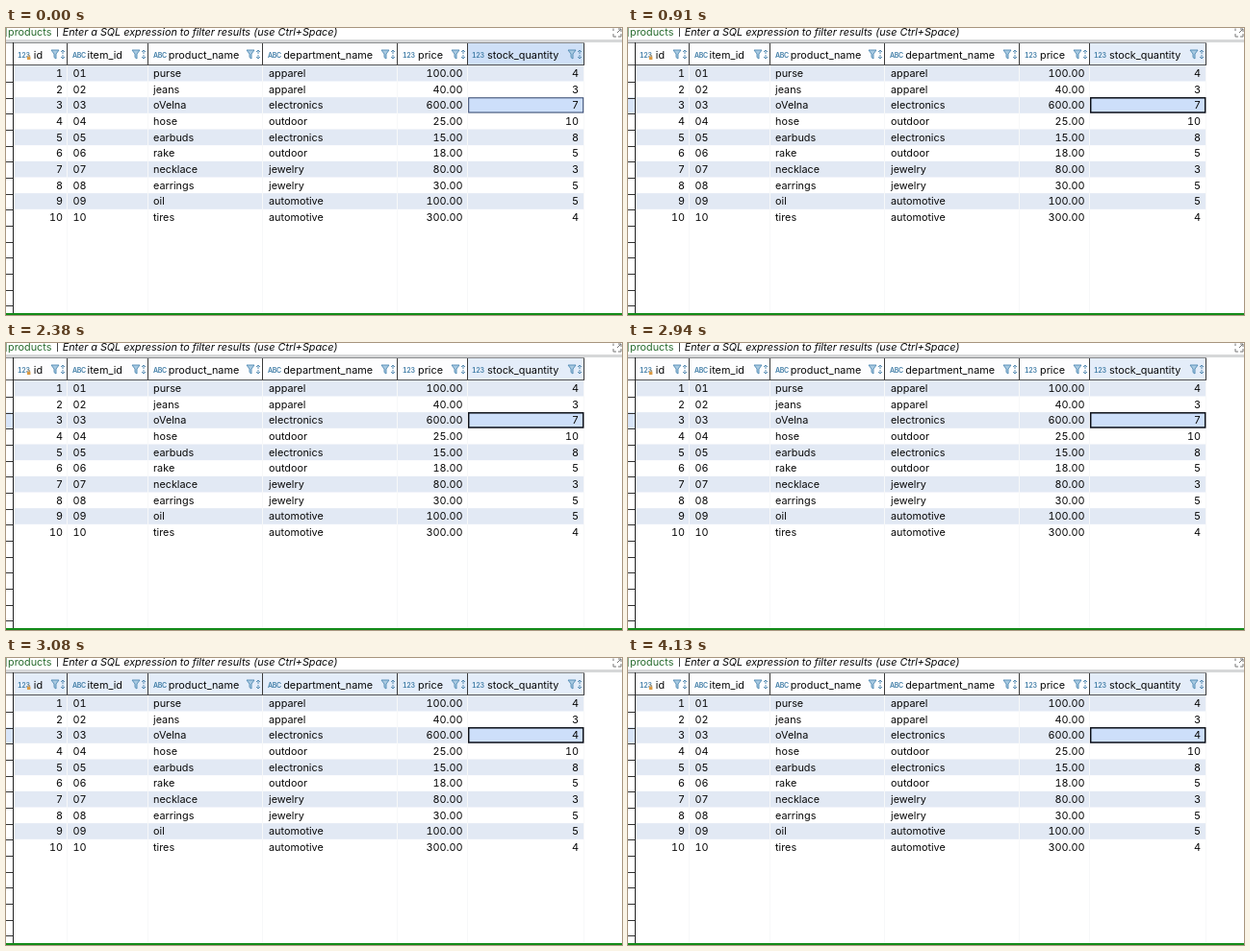
Write an HTML page that moves like this. It is 640 px wide and 299 px high and loops after 4270 ms.

```html
<!DOCTYPE html>
<html lang="en">
<head>
<meta charset="utf-8">
<title>Product table</title>
<style>
  html, body { margin: 0; width: 100%; height: 100%; overflow: hidden; background: #fff; }
  svg { display: block; width: 100vw; height: 100vh; }
  text { font: 10.85px Inter, "Open Sans", sans-serif; fill: #080808; font-variant-numeric: tabular-nums; }
  .hint { font-style: italic; }
  .table { fill: #276b2d; }
  .kind { font-size: 7px; font-weight: 600; fill: #3f7ca6; letter-spacing: -.3px; }
</style>
</head>
<body>
<svg id="stage" viewBox="0 0 640 299" preserveAspectRatio="none"></svg>
<script>
const LOOP = 4270, SELECT_AT = 630, EDIT_AT = 3010, FLASH_END = 3150;
const TOP = 38.8, ROW = 16.67;
const PLAIN = "#fdfdfe", TINT = "#e4edf9", STRONG = "#cfe0f7";
const svg = document.getElementById("stage");

function add(tag, attrs, content) {
  const el = document.createElementNS("http://www.w3.org/2000/svg", tag);
  for (const key in attrs) el.setAttribute(key, attrs[key]);
  if (content !== undefined) el.textContent = content;
  svg.append(el);
  return el;
}
const rect = (x, y, width, height, fill) => add("rect", { x, y, width, height, fill });
const line = (d, stroke, width = 1) =>
  add("path", { d, stroke, fill: "none", "stroke-width": width });
const label = (x, y, str, more) => add("text", { x, y, ...more }, str);

// name, right edge, type, type x, name x, value x, right-aligned
const columns = [
  ["id", 64, "123", 12, 28.8, 59, true],
  ["item_id", 148, "ABC", 69, 84.5, 69.5, false],
  ["product_name", 267, "ABC", 153, 168.8, 153, false],
  ["department_name", 407, "ABC", 272, 288.2, 273, false],
  ["price", 480, "123", 412, 428, 474.5, true],
  ["stock_quantity", 601, "123", 484, 500, 595, true]
];
const items = [
  ["purse", "apparel", 100, 4],
  ["jeans", "apparel", 40, 3],
  ["oVelna", "electronics", 600, 7],
  ["hose", "outdoor", 25, 10],
  ["earbuds", "electronics", 15, 8],
  ["rake", "outdoor", 18, 5],
  ["necklace", "jewelry", 80, 3],
  ["earrings", "jewelry", 30, 5],
  ["oil", "automotive", 100, 5],
  ["tires", "automotive", 300, 4]
];

function filterIcon(x) {
  add("path", { d: `M${x} 23h8l-3 4v5l-2-1.4v-3.6z`, fill: "#a9cae2", stroke: "#4f8ab3", "stroke-width": .9 });
  line(`M${x + 12} 27v-4m-2 2l2-2l2 2`, "#5b8fb5");
  line(`M${x + 12} 28v4m-2-2l2 2l2-2`, "#5b8fb5");
}

rect(0, 0, 640, 299, "#fff");

// Filter bar
line("M0.5 0V9", "#8fb392");
label(2, 8, "products", { class: "table" });
line("M53.5 0V9", "#444");
label(58.7, 8, "Enter a SQL expression to filter results (use Ctrl+Space)", { class: "hint" });
rect(0, 12, 640, 3, "#d6d7d8");
line("M631 3V0.5M631 6v3h3M636 9h3v-3M635 5l4-4m-3 0h3v3", "#777");

// Stripes and faint column rules
for (let i = 0; i < items.length; i += 2) rect(8, TOP + i * ROW, 592, ROW, "#e2e9f4");
for (const c of columns) line(`M${c[1] - .5} 39V297`, "#f7f8f9");

// Header
const header = rect(8, 16, 472, 22.5, PLAIN);
const picker = rect(480, 16, 120, 22.5, STRONG);
line("M0 15.5H601", "#8a8c8f");
line("M0 38.5H601", "#555");
for (const [name, right, kind, kindX, nameX] of columns) {
  line(`M${right - .5} 16V38.5`, "#3a3a3a");
  label(kindX, 30.6, kind, { class: "kind" });
  label(nameX, 31.8, name);
  filterIcon(right - 17);
}
rect(22, 30, 3.4, 3, "#dc9b43");
line("M22.7 30v-1.2q1-1.4 2 0v1.2", "#b98a4b", .8);

// Row gutter
const marker = rect(0, TOP + 2 * ROW, 7, ROW, "#d8e5f8");
for (let y = TOP + ROW; y < 297; y += ROW) line(`M0 ${Math.ceil(y) + .5}H7`, "#333");
line("M7.5 15V297", "#222");

// Selected cell
const cell = add("rect", { x: 480.7, y: 72.8, width: 119, height: 15.2, fill: "#cddffa" });

let edited;
items.forEach(([product, dept, price, stock], i) => {
  const id = i + 1;
  const values = [id, String(id).padStart(2, "0"), product, dept, price.toFixed(2), stock];
  values.forEach((value, k) => {
    const [x, end] = columns[k].slice(5);
    const el = label(x, 50.9 + i * ROW, value, { "text-anchor": end ? "end" : "start" });
    if (i === 2 && k === 5) edited = el;
  });
});

rect(0, 297, 640, 2, "#128a18");

function draw(now) {
  const t = now % LOOP;
  const picked = t >= SELECT_AT;
  const flash = t >= EDIT_AT && t < FLASH_END;
  header.setAttribute("fill", flash ? TINT : PLAIN);
  picker.setAttribute("fill", picked ? TINT : STRONG);
  marker.setAttribute("opacity", picked ? 1 : 0);
  cell.setAttribute("stroke", picked ? "#0c1018" : "#33456b");
  cell.setAttribute("stroke-width", picked ? 1.5 : 1);
  edited.textContent = t >= EDIT_AT ? "4" : "7";
}

const start = performance.now();
function tick() {
  draw(performance.now() - start);
  requestAnimationFrame(tick);
}
tick();
</script>
</body>
</html>
```
